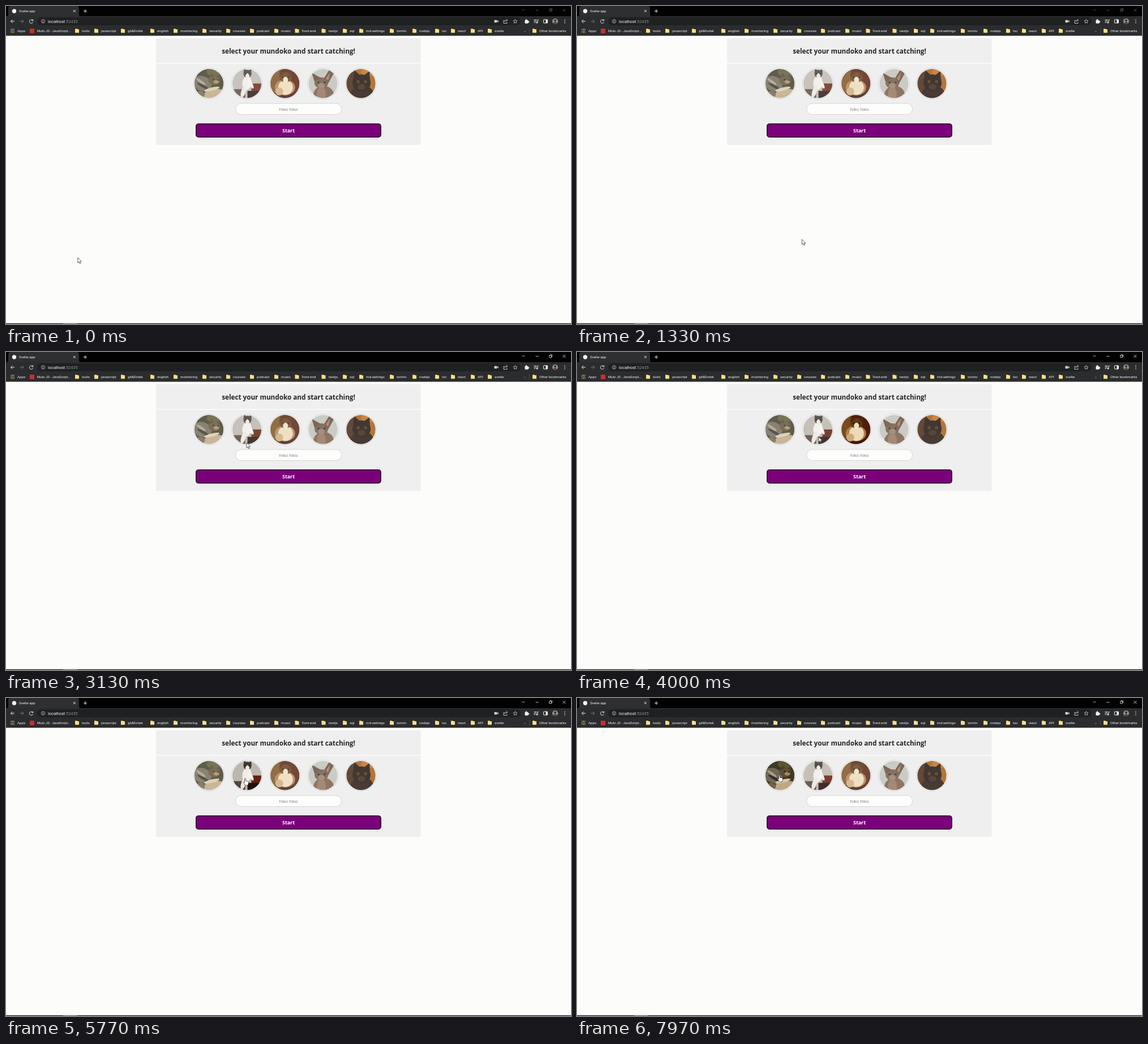
An HTML page for the animation above (8000 ms loop, 998 px wide and 561 px high).

```html
<!DOCTYPE html>
<html lang="en">
<head>
<meta charset="utf-8">
<title>Svelte app</title>
<style>
  html, body { margin: 0; width: 100%; height: 100%; overflow: hidden; background: #fcfcfa; }
  svg { display: block; width: 100vw; height: 100vh; }
  text { font: 6.2px Roboto, sans-serif; fill: #f6f7f8; white-space: pre; }
  .page { font-family: "Open Sans", sans-serif; text-anchor: middle; }
  .bold { font-weight: 700; }
  .icon { fill: none; stroke: #e4e6e8; stroke-width: 1; }
</style>
</head>
<body>
<svg id="stage" viewBox="0 0 998 561" xmlns="http://www.w3.org/2000/svg"></svg>
<script>
const stage = document.getElementById('stage');

const rect = (x, y, w, h, fill, rx = 0, extra = '') =>
  `<rect x="${x}" y="${y}" width="${w}" height="${h}" rx="${rx}" fill="${fill}" ${extra}/>`;
const circle = (x, y, r, fill, extra = '') => `<circle cx="${x}" cy="${y}" r="${r}" fill="${fill}" ${extra}/>`;
const ellipse = ([x, y, rx, ry, fill, turn = 0]) =>
  `<ellipse rx="${rx}" ry="${ry}" fill="${fill}" transform="translate(${x} ${y}) rotate(${turn})"/>`;
const shape = (d, fill) => `<path d="${d}" fill="${fill}"/>`;
const icon = (d, extra = '') => `<path class="icon" d="${d}" ${extra}/>`;
const label = (x, y, content, extra = '') => `<text x="${x}" y="${y}" ${extra}>${content}</text>`;
const folder = x => rect(x, 40, 4, 3, '#e9c25c', .6) + rect(x, 41, 7, 6.3, '#fbdf83', .6);

// Browser window
const bookmarks = [
  ['tools', 122], ['javascript', 156], ['git&amp;forlek', 203], ['english', 255], ['monitoring', 296],
  ['security', 347], ['courses', 389], ['podcast', 431], ['music', 474], ['front-end', 510.5],
  ['nextjs', 557.5], ['sql', 595], ['md-settings', 624], ['tormiv', 678], ['nodejs', 718],
  ['tsc', 758], ['react', 786], ['API', 821], ['svelte', 851], ['Other bookmarks', 930]
];

function appsGrid() {
  const colors = ['#e4584a', '#5c98f0', '#57b56b', '#efc14a'];
  let dots = '';
  for (let i = 0; i < 9; i++)
    dots += rect(8 + i % 3 * 2.6, 40.3 + Math.floor(i / 3) * 2.6, 1.7, 1.7, colors[(i * 2 + i % 3) % 4]);
  return dots;
}

function browser() {
  const tabAndBars = rect(0, 0, 998, 18, '#020202')
    + shape('M1 18Q4 18 4 15V4Q4 0 8 0H125Q129 0 129 4V15Q129 18 132 18Z', '#2e2f31')
    + rect(0, 18, 998, 34.5, '#2b2c2e')
    + rect(55, 20, 854, 14, '#1f2022', 7);
  const tab = circle(14.5, 9, 3.7, '#f4f4f4')
    + label(23, 11.2, 'Svelte app')
    + icon('M118.8 6.8l4 4m0-4l-4 4M140 6v6m-3-3h6');
  const navigation = icon('M15 27H8.5m3-3l-3 3 3 3')
    + icon('M24.5 27H31m-3-3l3 3-3 3', 'style="stroke:#77797d"')
    + icon('M47.2 25.4A3.2 3.2 0 1 0 47.6 28.4M47.7 23.5v2.4h-2.5')
    + circle(65.5, 27, 3.2, 'none', 'stroke="#c4c7ca" stroke-width=".8"')
    + icon('M65.5 26.5v2.3m0-4v.8', 'stroke-width=".8"')
    + `<text x="74" y="29.6" style="font-size:7.4px">localhost<tspan fill="#8d9298">:52435</tspan></text>`;
  const actions = rect(862.5, 24.8, 5, 4.5, '#cfd1d4', .8) + shape('M867.5 27l2.3-2v4Z', '#cfd1d4')
    + icon('M881 25.5h-2v5h6v-2M881 28q.5-3 4-3m-1.5-2l2.3 2-2.3 2', 'style="stroke-width:.8"')
    + icon('M899.5 23.5l1 2.3 2.5.2-1.9 1.7.6 2.5-2.2-1.3-2.2 1.3.6-2.5-1.9-1.7 2.5-.2Z', 'style="stroke-width:.7"')
    + rect(916.5, 25, 6, 5.8, '#f0f1f2', .8) + circle(919, 24.6, 1.3, '#f0f1f2') + circle(923, 28, 1.3, '#f0f1f2')
    + icon('M932.5 24.5h5m-5 2.3h5m-5 2.3h3M939 29v-4.5h1.8') + circle(938, 29.3, 1.3, '#f0f1f2')
    + rect(949.5, 24, 7, 6, 'none', .5, 'stroke="#f0f1f2"') + rect(953.5, 24, 3, 6, '#f0f1f2')
    + circle(970, 27, 5, '#8d9c86') + circle(970, 25.5, 1.9, '#35272a') + shape('M966.3 30.3Q970 25.5 973.7 30.3Q970 33.6 966.3 30.3Z', '#6d3a3c')
    + [24.3, 27, 29.7].map(y => circle(987, y, .8, '#e8eaed')).join('');
  const controls = `<g id="controls">${icon('M911.5 5.8l2.5 2.5 2.5-2.5M935.5 7.5h5M959.7 6h3.6v3.7h-3.6ZM961 6v-1.2h3.6v3.6h-1.2M983.5 5l5 5m0-5l-5 5', 'style="stroke-width:.8"')}</g>`;
  const bar = appsGrid() + label(20, 46, 'Apps')
    + rect(42, 40, 8, 8, '#c3312c') + label(55, 46, 'Mulo JS - JavaScript...', 'style="font-size:6px"')
    + bookmarks.map(([name, x]) => folder(x) + label(x + 12, 46, name)).join('')
    + label(915, 46, '»', 'fill-opacity=".6"') + rect(924, 39, .7, 10, '#55575b');
  return tabAndBars + tab + navigation + actions + controls + bar
    + rect(0, 559.8, 998, 1.2, '#151515') + rect(101, 559.8, 25, 1.2, '#777');
}

// Cat portraits, drawn around their own centre
const portraits = [
  circle(0, 0, 26, '#39361f') + [
    [12, -20, 16, 8, '#57532f'], [-12, 0, 17, 13, '#6d6552', 20], [-14, -3, 10, 2.5, '#a49a84', 35],
    [-10, 5, 12, 2.5, '#2f2b22', 30], [10, 19, 20, 9, '#bda57f', -8], [-16, 19, 9, 6, '#6f5f49'],
    [9, -6, 10, 9, '#5c4b31'], [13, -3, 5, 3, '#a58859'], [5, 10, 14, 3, '#d8c8a8', -14]
  ].map(ellipse).join('') + shape('M2-10L4-19 9-13ZM13-13L20-17 19-8Z', '#4d3d26')
    + circle(8, -7, 1.2, '#100d08') + circle(16, -6, 1.2, '#100d08'),

  circle(0, 0, 26, '#bcb7ae') + rect(8, 0, 20, 28, '#61210f') + rect(-27, 10, 24, 18, '#57433a')
    + rect(1, 13, 26, 15, '#24100b') + [
      [0, -1, 8, 13, '#f1eeea', 8], [-6, 14, 4, 11, '#ebe6df', 18], [7, 1, 3, 9, '#f5f1ee', -28],
      [1, -17, 7, 7, '#3f3932'], [1, -13, 3.5, 5, '#f0eae1']
    ].map(ellipse).join('') + shape('M-6-18L-5-27 0-22ZM3-22L8-27 8-16Z', '#3f3932')
    + circle(-2, -17, 1, '#111') + circle(4, -17, 1, '#111'),

  circle(0, 0, 26, '#521a06') + rect(-27, -27, 20, 55, '#784a19') + rect(-27, 17, 54, 12, '#3a1205') + [
    [0, 7, 18, 14, '#a97d4b'], [1, 7, 13, 13, '#eedab6'], [-10, 14, 7, 7, '#cda978'],
    [1, -11, 11, 9, '#5f3614'], [1, -6, 4.5, 6, '#f0dfc2']
  ].map(ellipse).join('') + shape('M-10-12L-9-24-2-18ZM5-18L12-23 12-10Z', '#4c270b')
    + circle(-4, -11, 1.3, '#180b03') + circle(6, -11, 1.3, '#180b03'),

  circle(0, 0, 26, '#bfc0b8') + [
    [1, 20, 18, 16, '#74543e'], [-3, 19, 8, 13, '#8f6f56'], [-3, -1, 12, 10, '#69503c'],
    [-3, 4, 6, 5, '#927560']
  ].map(ellipse).join('') + shape('M-15-3L-20-19-4-10ZM2-10L11-24 20-20 9 0Z', '#61422f')
    + shape('M5-9L13-20 9-5Z', '#a2755f') + circle(-8, -2, 1.7, '#1d170e') + circle(3, -2, 1.7, '#1d170e'),

  circle(0, 0, 26, '#a0560c') + [
    [-18, 2, 14, 24, '#3f1d07'], [14, -20, 14, 7, '#bd6a17'], [2, 18, 20, 15, '#1d0c03'],
    [1, -1, 16, 15, '#130803'], [1, 6, 7, 5, '#331a08']
  ].map(ellipse).join('') + shape('M-14-6L-12-24-1-14ZM5-14L15-22 16-4Z', '#130803')
    + circle(-5, -3, 2.4, '#7c4a0e') + circle(8, -3, 2.4, '#7c4a0e')
    + circle(-5, -3, 1.3, '#050200') + circle(8, -3, 1.3, '#050200')
];
const centers = [358.5, 425.5, 492.7, 560, 627];
const centerY = 136.7;

function page() {
  const avatars = portraits.map((art, i) => `<g transform="translate(${centers[i]} ${centerY})">
    ${circle(0, 0, 27.2, '#fafafa', 'stroke="#c9c9cb" stroke-width=".8"')}
    <g class="portrait" clip-path="url(#round)">${art}</g></g>`).join('');
  return `<clipPath id="round">${circle(0, 0, 25.7, '#000')}</clipPath>`
    + rect(265, 57, 467.5, 43.5, '#efefef', 2) + rect(265, 102, 467.5, 143, '#efefef', 2)
    + label(499, 84, 'select your mundoko and start catching!', 'class="page bold" style="font-size:11.7px;fill:#242424"')
    + avatars
    + rect(405.5, 172, 187, 19.5, '#fdfdfc', 9.75, 'stroke="#c8c8c8" stroke-width=".7"')
    + label(499, 185, 'hiko hiko', 'class="page" style="font-size:7.8px;fill:#777"')
    + rect(335.7, 207.8, 326.4, 23.5, '#7b007b', 4.3, 'stroke="#080008" stroke-width="1.3"')
    + label(499, 223.2, 'Start', 'class="page bold" style="font-size:8.9px;fill:#fff"');
}

const pointers = `<g id="cursor" fill="#fff" stroke="#222" stroke-width=".7" stroke-linejoin="round">
  <path id="arrow" d="M0 0V9.3L2.2 7.2 3.7 10.6 5 10 3.6 6.8H6.5Z"/>
  <path id="hand" d="M-1 7V1.2Q-1 0 0 0T1 1.2V4.2L4.8 5Q5.8 5.3 5.8 6.3V8.5L4.8 12H.2L-2.8 7.6Q-3.4 6.4-2.4 6.2Z"/></g>`;

stage.innerHTML = rect(0, 0, 998, 561, '#fcfcfa') + browser() + page() + pointers;

// Motion: time, x, y of the pointer tip
const LOOP = 8000, FOCUS_TIME = 2000, FADE = 200, POINTER_LAG = 30, RESTING_OPACITY = .8;
const path = [
  [30, 126.8, 444], [830, 318, 421], [1300, 397.4, 411.7], [2370, 397.4, 411.7], [3130, 425, 160],
  [3300, 430, 172], [3600, 490, 150], [3925, 500, 144], [4000, 427, 149.5], [4250, 362, 140],
  [4600, 425, 138], [4830, 492, 140], [5150, 560, 142], [5350, 600, 150], [5650, 426, 143],
  [5770, 422.5, 142], [6530, 422.5, 142], [6650, 468, 141], [6970, 468, 141], [7270, 531, 141],
  [7500, 531, 141], [7650, 493, 141], [7760, 425, 140], [7840, 386, 138], [7970, 357.5, 136]
];

function position(time) {
  const next = path.findIndex(key => key[0] > time);
  if (next === 0) return path[0].slice(1);
  if (next < 0) return path[path.length - 1].slice(1);
  const [t0, x0, y0] = path[next - 1], [t1, x1, y1] = path[next];
  const u = (time - t0) / (t1 - t0);
  return [x0 + (x1 - x0) * u, y0 + (y1 - y0) * u];
}

function hovered(time) {
  const [x, y] = position(time);
  return centers.findIndex(cx => Math.hypot(x - cx, y - centerY) < 27);
}

const element = id => document.getElementById(id);
const cursor = element('cursor'), arrow = element('arrow'), hand = element('hand'), controls = element('controls');
const photos = [...document.querySelectorAll('.portrait')];

function render(time) {
  // The share of recent time under the pointer gives a stateless fade.
  const recent = Array.from({ length: 20 }, (_, i) => hovered(time - i * FADE / 20));
  photos.forEach((photo, i) => {
    const share = recent.filter(h => h === i).length / recent.length;
    photo.setAttribute('opacity', 1 - (1 - RESTING_OPACITY) * (1 - share) ** 2);
  });
  const pointing = hovered(time - POINTER_LAG) >= 0;
  hand.setAttribute('visibility', pointing ? 'visible' : 'hidden');
  arrow.setAttribute('visibility', pointing ? 'hidden' : 'visible');
  cursor.setAttribute('transform', `translate(${position(time).join(' ')})`);
  controls.setAttribute('opacity', time < FOCUS_TIME ? .4 : 1);
}

const start = performance.now();
function tick() {
  render((performance.now() - start) % LOOP);
  requestAnimationFrame(tick);
}
tick();
</script>
</body>
</html>
```
